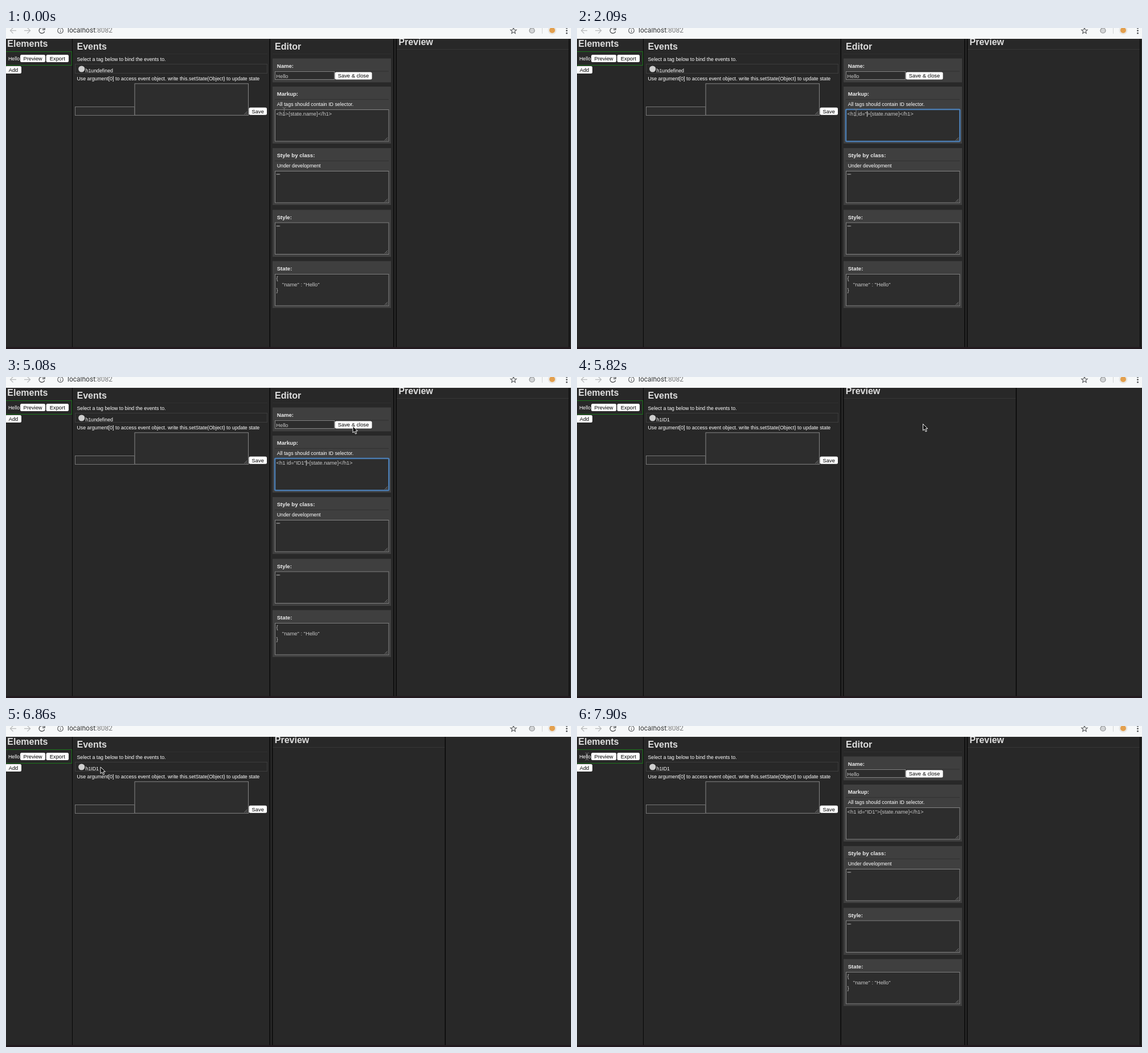
An HTML page with a canvas that plays this animation: 992x564 px, repeating every 8000 ms.

```html
<!DOCTYPE html>
<html lang="en">
<head>
<meta charset="utf-8">
<title>Element editor</title>
<style>
  html, body { margin: 0; width: 100%; height: 100%; overflow: hidden; background: #282828; }
  canvas { display: block; }
</style>
</head>
<body>
<canvas id="stage" width="992" height="564"></canvas>
<script>
const ctx = document.getElementById('stage').getContext('2d');
const LOOP = 8000;
const SANS = '"Liberation Sans", Arial, sans-serif';
const HEADING = `bold 16px ${SANS}`;
const LABEL = `bold 9.6px ${SANS}`;
const BODY = `8.8px ${SANS}`;
const FIELD = `9.33px ${SANS}`;

// Each entry holds until the next one: [time, value...]
const typed = [[0, ''], [890, ' '], [1340, ' i'], [1490, ' id'], [1790, ' id='], [2090, ' id="'],
  [2690, ' id="I'], [2840, ' id="ID'], [3290, ' id="ID1'], [3890, ' id="ID1"']];
const pointer = [
  [0, 488.5, 146, 'beam'], [290, 489, 147, 'beam'], [440, 490, 148.5, 'beam'],
  [4340, 492, 147, 'beam'], [4490, 501, 137, 'arrow'], [4640, 530, 120, 'arrow'],
  [4790, 570, 102, 'arrow'], [4930, 598, 91, 'arrow'], [5080, 609, 86.5, 'arrow'],
  [5230, 610, 85, 'arrow'], [5380, 608.5, 83, 'arrow'], [5530, 607.5, 82.5, 'arrow'],
  [6120, 470, 80, 'arrow'], [6270, 270, 76, 'arrow'], [6420, 176, 74, 'arrow'],
  [6860, 166, 72, 'arrow'], [7010, 120, 65, 'arrow'], [7160, 66, 58, 'arrow'],
  [7310, 28, 54, 'arrow'], [7450, 17.5, 53.5, 'beam']
];
const views = [[0, 'edit'], [5820, 'events'], [7600, 'closed'], [7900, 'edit']];
const at = (track, t) => track.findLast(key => key[0] <= t);

function rect(x, y, w, h, fill, border) {
  if (fill) { ctx.fillStyle = fill; ctx.fillRect(x, y, w, h); }
  if (border) { ctx.strokeStyle = border; ctx.lineWidth = 1; ctx.strokeRect(x + .5, y + .5, w - 1, h - 1); }
}

function text(string, x, y, font = BODY, color = '#fff') {
  ctx.font = font;
  ctx.fillStyle = color;
  ctx.fillText(string, x, y);
}

function line(points, color, width = 1) {
  ctx.strokeStyle = color;
  ctx.lineWidth = width;
  ctx.beginPath();
  points.forEach(([x, y]) => ctx.lineTo(x, y));
  ctx.stroke();
}

function disc(x, y, r, fill, border) {
  ctx.beginPath();
  ctx.arc(x, y, r, 0, 7);
  if (fill) { ctx.fillStyle = fill; ctx.fill(); }
  if (border) { ctx.strokeStyle = border; ctx.lineWidth = 1.2; ctx.stroke(); }
}

const divider = (x, width = 1.5) => rect(x, 19, width, 545, '#080808');

function button(label, x, y, w, h = 13) {
  ctx.fillStyle = '#fff';
  ctx.beginPath();
  ctx.roundRect(x, y, w, h, 2.5);
  ctx.fill();
  ctx.textAlign = 'center';
  text(label, x + w / 2, y + 9.8, FIELD, '#000');
  ctx.textAlign = 'left';
}

function textarea(x, y, lines = [], h = 56.5) {
  rect(x, y, 200.5, h, '#2d2d2d', '#858585');
  for (const d of [3, 6]) line([[x + 199 - d, y + h - 2], [x + 198, y + h - 1 - d]], '#999', .8);
  lines.forEach((s, i) => text(s, x + 2.5, y + 11.3 + i * 10.5, FIELD, '#c8c8c8'));
}

function toolbar() {
  rect(0, 0, 992, 19, '#f6f8f9');
  line([[18, 4.5], [7.5, 4.5]], '#b8babc', 1.3);
  line([[12.5, -.5], [7.5, 4.5], [12.5, 9.5]], '#b8babc', 1.3);
  line([[32, 4.5], [42.5, 4.5]], '#b8babc', 1.3);
  line([[37.5, -.5], [42.5, 4.5], [37.5, 9.5]], '#b8babc', 1.3);
  ctx.strokeStyle = '#505255';
  ctx.lineWidth = 1.4;
  ctx.beginPath();
  ctx.arc(63, 4.5, 4.8, .3, 5.5);
  ctx.stroke();
  line([[68, -1], [68, 3], [64, 3]], '#505255', 1.4);
  disc(95.5, 4.5, 4.8, null, '#606265');
  rect(95, 4, 1, 3.5, '#606265');
  rect(95, 1.8, 1, 1.2, '#606265');
  const font = '12px Roboto, sans-serif';
  text('localhost', 108, 8, font, '#303336');
  text(':8082', 108 + ctx.measureText('localhost').width, 8, font, '#77797c');
  const star = Array.from({ length: 12 }, (_, i) => {
    const a = (i / 5 - .5) * Math.PI, r = i % 2 ? 2.4 : 5.5;
    return [891 + r * Math.cos(a), 5 + r * Math.sin(a)];
  });
  line(star, '#55585b', 1.1);
  disc(923.5, 4.5, 4.5, '#d2d4d6', '#8c8e90');
  rect(941, 0, 1, 10, '#d2d4d6');
  disc(959, 4, 7.5, '#e9e7e3');
  disc(959, 4, 5, '#e3a04e');
  for (const y of [.2, 4.7, 9.2]) disc(984.5, y, 1.4, '#505255');
}

function elements(selected) {
  const shift = selected ? 0 : -1;
  text('Elements', 2.3, 33, HEADING, '#dedede');
  if (selected) rect(-1, 41, 117, 25, null, '#1c751c');
  else rect(-1, 40, 115, 25, null, '#444');
  text('Hello', 4 + shift, 57 + shift);
  button('Preview', 25 + shift, 47 + shift, 44);
  button('Export', 70.5 + shift, 47 + shift, 39.5);
  button('Add', -1, 67 + shift, 28);
}

function events(tag) {
  divider(116, 1);
  text('Events', 124.5, 38, HEADING, '#dedede');
  rect(121, 45, 338, 1, '#303030');
  text('Select a tag below to bind the events to.', 124.5, 57.7);
  rect(121, 63, 338, 17, null, '#3d3d3d');
  disc(132.7, 72, 5.6, '#cecece');
  text(tag, 139.5, 77.5);
  text('Use argument[0] to access event object. write this.setState(Object) to update state', 124.5, 92);
  rect(121, 138, 105, 16, '#2d2d2d', '#777');
  textarea(225.5, 97.3);
  button('Save', 426.5, 139.7, 31.5);
  divider(462.5);
}

function card(title, y, h, note) {
  rect(468, y, 208, h, '#3f3f3f');
  text(title, 475.7, y + 16, LABEL, '#ececec');
  rect(472, y + 22, 200, 1, '#303030');
  if (note) text(note, 475.7, y + 34.3);
}

function editor(inserted, focused, caret) {
  text('Editor', 472, 38, HEADING, '#dedede');
  rect(468, 45, 208, 1, '#303030');
  card('Name:', 53.5, 42);
  rect(472, 76, 105, 15, '#2d2d2d', '#858585');
  text('Hello', 474.3, 87.5, FIELD, '#c8c8c8');
  button('Save & close', 577.5, 77.5, 65);

  card('Markup:', 103, 100, 'All tags should contain ID selector.');
  const before = '<h1' + inserted;
  textarea(472, 143, [before + '>{state.name}</h1>']);
  if (focused) {
    ctx.strokeStyle = 'rgba(70, 130, 195, .8)';
    ctx.lineWidth = 2.6;
    ctx.beginPath();
    ctx.roundRect(472, 143, 200.3, 56.3, 2);
    ctx.stroke();
  }
  if (caret) {
    ctx.font = FIELD;
    rect(474.5 + ctx.measureText(before).width, 146, 1, 10, '#d0d0d0');
  }

  card('Style by class:', 211, 100, 'Under development');
  textarea(472, 251, ['""']);
  card('Style:', 319.5, 82.5);
  textarea(472, 341.5, ['""']);
  card('State:', 409.5, 82.5);
  textarea(472, 432, ['{', '    "name" : "Hello"', '}']);
  divider(680);
}

function preview(x) {
  divider(x);
  text('Preview', x + 4.8, 30, HEADING, '#dedede');
  rect(x + 1.5, 37, 302, 1, '#363636');
  divider(x + 303.5);
}

function cursor(x, y, kind) {
  if (kind === 'beam') {
    line([[x - 3, y - 6.5], [x, y - 5], [x + 3, y - 6.5]], '#7c7c7c');
    line([[x, y - 5], [x, y + 5]], '#7c7c7c');
    line([[x - 3, y + 6.5], [x, y + 5], [x + 3, y + 6.5]], '#7c7c7c');
    return;
  }
  const shape = [[0, 0], [0, 11.5], [2.7, 9], [4.6, 13.5], [6.6, 12.7], [4.7, 8.3], [8.3, 8.3]];
  ctx.beginPath();
  shape.forEach(([dx, dy]) => ctx.lineTo(x + dx, y + dy));
  ctx.closePath();
  ctx.fillStyle = '#080808';
  ctx.fill();
  ctx.strokeStyle = '#f4f4f4';
  ctx.lineWidth = 1;
  ctx.stroke();
}

function draw(now) {
  const t = now % LOOP;
  const view = at(views, t)[1];
  rect(0, 0, 992, 564, '#282828');
  elements(view !== 'closed');
  if (view !== 'closed') events(t < 5820 ? 'h1undefined' : 'h1ID1');
  if (view === 'edit') {
    editor(at(typed, t)[1], t >= 440 && t < 5820, t >= 590 && t < 5820);
  }
  preview({ edit: 684.5, events: 467, closed: 118 }[view]);
  rect(0, 560.5, 992, 3.5, '#231a1f');
  toolbar();
  cursor(...at(pointer, t).slice(1));
  requestAnimationFrame(draw);
}
requestAnimationFrame(draw);
</script>
</body>
</html>
```
